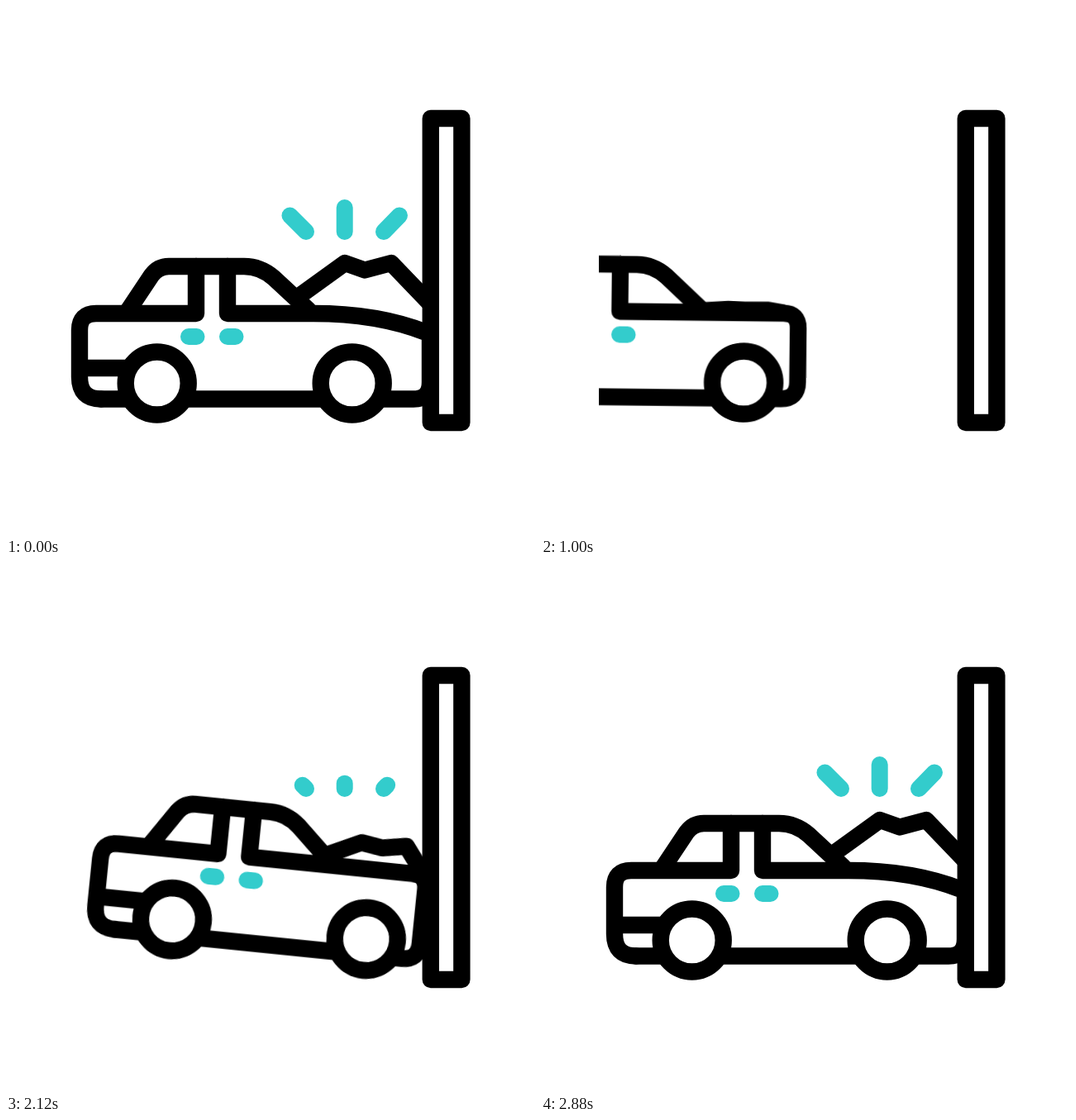
Write an HTML page without scripts that moves like this. It is 640 px wide and 640 px high and loops after 3 s.

```html
<!DOCTYPE html>
<html lang="en">
<head>
<meta charset="utf-8">
<title>Car crash</title>
<style>
  html, body { margin: 0; width: 100%; height: 100%; overflow: hidden; background: #fff; }
  svg { display: block; width: 100%; height: 100%; }
  .ink { fill: none; stroke: #000; stroke-width: 20.4; stroke-linecap: round; stroke-linejoin: round; }
  .solid { fill: #fff; }
  .teal { stroke: #3cc; stroke-width: 20; }

  .drive, .tilt, .hood, .front, .rays { animation: 3s linear infinite; }
  .drive { animation-name: drive; }
  .tilt { animation-name: tilt; transform-origin: 419px 456.5px; }
  .hood { animation-name: hood; }
  .front { animation-name: front; }
  .rays { animation-name: rays; stroke-dasharray: 1 2; }

  @keyframes drive {
    0%, 4% { transform: translate(0, 0); animation-timing-function: ease-in; }
    12% { transform: translate(9px, 0); animation-timing-function: ease-out; }
    24%, 26.667% { transform: translate(20px, -1.5px); animation-timing-function: cubic-bezier(.333, 0, .667, 1); }
    41.333%, 60% { transform: translate(-424.5px, 0); animation-timing-function: cubic-bezier(.333, 0, .667, 1); }
    70.667% { transform: translate(17px, -1.5px); }
    74% { transform: translate(20px, -1.5px); animation-timing-function: cubic-bezier(.4, 0, .6, .9); }
    85.333% { transform: translate(4px, 0); animation-timing-function: ease-out; }
    96%, 100% { transform: translate(0, 0); }
  }

  @keyframes tilt {
    0%, 4% { transform: rotate(0deg); animation-timing-function: ease-in; }
    12% { transform: rotate(4.6deg); animation-timing-function: ease-out; }
    24.667%, 26.667% { transform: rotate(11.8deg); animation-timing-function: ease-in-out; }
    34.667%, 66.667% { transform: rotate(0deg); animation-timing-function: ease-in; }
    70.667% { transform: rotate(5.7deg); animation-timing-function: ease-out; }
    74.667% { transform: rotate(11.8deg); animation-timing-function: cubic-bezier(.4, 0, .6, .95); }
    85.333% { transform: rotate(.8deg); animation-timing-function: ease-out; }
    96%, 100% { transform: rotate(0deg); }
  }

  @keyframes hood {
    0%, 4%, 96%, 100% { d: path("M356 350 L410 311 L434 319.5 L466 311 L514 361"); }
    12% { d: path("M357 349 L401 309 L425 317 L458 309 L502 363"); }
    22.667% { d: path("M359 349 L393 313 L413 322 L449 317 L476 366"); }
    26.667% { d: path("M362 350 L390 326 L410 334 L445 331 L465 368"); }
    34%, 66.667% { d: path("M365 372 L400 372 L420 372 L448 372 L466 372"); }
    70.667% { d: path("M363 359 L401.5 341 L427 345 L456 340 L477 368"); }
    77.333% { d: path("M357 349 L400 313 L423 321 L456 313 L494 364"); }
    85.333% { d: path("M356 350 L407 311 L431 319 L463 311 L510 361"); }
  }

  @keyframes front {
    0%, 4%, 96%, 100% { d: path("M268 315 V372 H372 C430 372 475 382 507 394.5 Q513 397 513 403 V455 Q513 475.5 493 475.5 H115"); }
    26.667% { d: path("M268 315 V372 H372 C425 372 460 380 480 389 Q487 392 487 400 V455 Q487 475.5 467 475.5 H115"); }
    32%, 70.667% { d: path("M268 315 V372 H372 C405 372 440 372 466 372 Q484 372 484 390 V455 Q484 475.5 464 475.5 H115"); }
    76% {
      d: path("M268 315 V372 H372 C425 372 460 380 480 389 Q487 392 487 400 V455 Q487 475.5 467 475.5 H115");
      animation-timing-function: cubic-bezier(.2, .7, .4, 1);
    }
  }

  @keyframes rays {
    0%, 20% { stroke-dashoffset: 0; opacity: 1; animation-timing-function: ease-in-out; }
    26.6% { stroke-dashoffset: 1; opacity: 1; animation-timing-function: step-start; }
    26.667%, 66.66% { stroke-dashoffset: 1; opacity: 0; animation-timing-function: step-end; }
    66.667% { stroke-dashoffset: 1; opacity: 1; animation-timing-function: cubic-bezier(.333, 0, .667, 1); }
    80%, 100% { stroke-dashoffset: 0; opacity: 1; }
  }
</style>
</head>
<body>
<svg viewBox="0 0 640 640" class="ink">
  <clipPath id="road"><rect x="70.5" y="200" width="460" height="340"/></clipPath>

  <g class="rays teal">
    <path pathLength="1" d="M363 273 L343.5 253.5"/>
    <path pathLength="1" d="M409.7 273 V244"/>
    <path pathLength="1" d="M457 273 L476 253.5"/>
  </g>

  <g clip-path="url(#road)">
    <g class="drive">
      <g class="tilt">
        <path class="hood" d="M356 350 L410 311 L434 319.5 L466 311 L514 361"/>
        <path class="front" d="M268 315 V372 H372 C430 372 475 382 507 394.5 Q513 397 513 403 V455 Q513 475.5 493 475.5 H115"/>
        <path d="M115 475.5 Q89 475.5 89 449 V392 Q89 372 109 372 H230 V315 M89 438 H145"/>
        <path d="M146 371 L176 326 Q184 315 197 315 H288 Q308 315 324 329 L366 368"/>
        <path class="teal" d="M221 400 H230.5 M268 400 H277.5"/>
        <circle class="solid" cx="182.7" cy="456.5" r="38"/>
        <circle class="solid" cx="418.7" cy="456.5" r="38"/>
      </g>
    </g>
  </g>

  <rect class="solid" x="513.8" y="136" width="37.6" height="368"/>
</svg>
</body>
</html>
```
